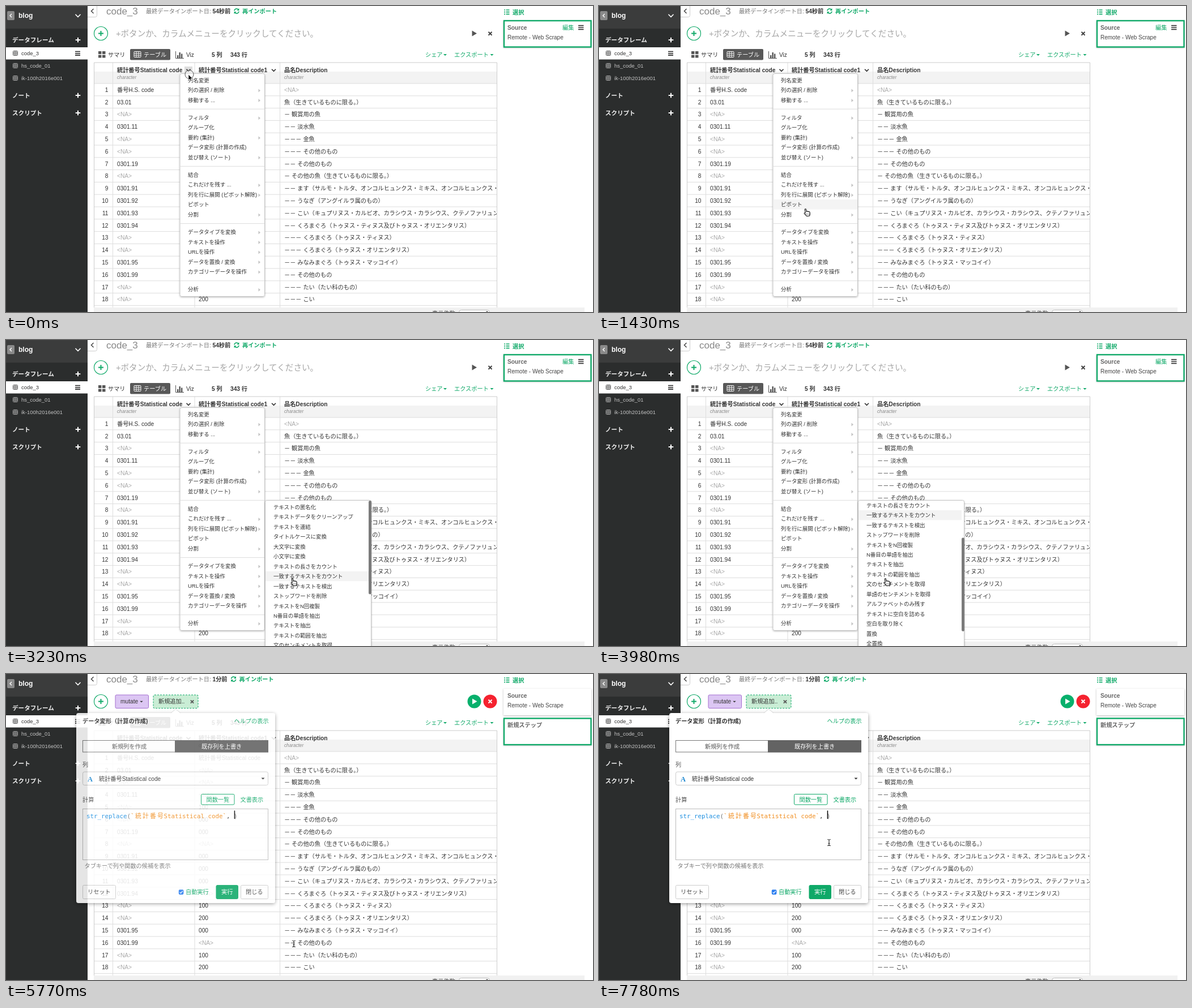
An HTML page for the animation above (8 s loop, 1036 by 541 pixels).

```html
<!DOCTYPE html>
<html lang="ja">
<head>
<meta charset="utf-8">
<style>
html, body { margin: 0; width: 100%; height: 100%; overflow: hidden; background: #fff; }
svg { display: block; width: 1036px; height: 541px; font-family: "Liberation Sans", "Noto Sans CJK JP", "Noto Sans CJK", sans-serif; }
text { white-space: pre; }
</style>
</head>
<body>
<svg id="stage" viewBox="0 0 1036 541" xmlns="http://www.w3.org/2000/svg"></svg>
<script>
const GREEN = '#0fa968', INK = '#333', GRAY = '#aaa', LOOP = 8000;

// ---- drawing helpers (text y is the optical middle of the line) ----
const esc = s => s.replace(/&/g, '&amp;').replace(/</g, '&lt;');
const text = (x, y, s, fill = INK, size = 10.2, extra = '') =>
  `<text x="${x}" y="${(y + size * .37).toFixed(2)}" font-size="${size}" fill="${fill}" ${extra}>${esc(s)}</text>`;
const bold = (x, y, s, fill = INK, size = 10.2) => text(x, y, s, fill, size, 'font-weight="700"');
const medium = (x, y, s, fill = GREEN) => text(x, y, s, fill, 10.2, 'font-weight="500"');
const rect = (x, y, w, h, fill = 'none', extra = '') =>
  `<rect x="${x}" y="${y}" width="${w}" height="${h}" fill="${fill}" ${extra}/>`;
const path = (d, stroke, width = 1, extra = '') =>
  `<path d="${d}" fill="none" stroke="${stroke}" stroke-width="${width}" ${extra}/>`;
const shape = (d, fill) => `<path d="${d}" fill="${fill}"/>`;
const group = (id, body, extra = '') => `<g id="${id}" ${extra}>${body}</g>`;
const plus = (x, y, r, color, w) => path(`M${x - r} ${y}H${x + r}M${x} ${y - r}V${y + r}`, color, w);
const cross = (x, y, r, color, w) => path(`M${x - r} ${y - r}l${2 * r} ${2 * r}m0 ${-2 * r}l${-2 * r} ${2 * r}`, color, w);
const chevron = (x, y, r, color, w) => path(`M${x - r} ${y - r / 2}l${r} ${r}l${r} ${-r}`, color, w);
const left = (x, y, r, color, w) => path(`M${x + r / 2} ${y - r}l${-r} ${r}l${r} ${r}`, color, w);
const caretDown = (x, y, color, r = 3) => shape(`M${x - r} ${y - r / 2}h${2 * r}l${-r} ${r}z`, color);
const bars = (x, y, w, gap, color) => path([-1, 0, 1].map(i => `M${x} ${y + i * gap}h${w}`).join(''), color, 1.6);
const gridIcon = (x, y, w, h, color) =>
  rect(x, y, w, h, 'none', `stroke="${color}" rx="1"`) +
  path(`M${x} ${y + h / 3}h${w}M${x} ${y + h * 2 / 3}h${w}M${x + w / 3} ${y}v${h}M${x + w * 2 / 3} ${y}v${h}`, color, .9);

// ---- static page ----
function sidebar() {
  const section = (y, s) => bold(11, y, s, '#eee', 10.6) + plus(127, y, 4.3, '#fff', 2);
  return rect(0, 0, 144, 541, '#2b2d2d') + rect(0, 0, 144, 40, '#3b3c3c') +
    rect(2, 9, 13, 16, '#8a8a8a', 'rx="2"') + left(8.5, 17, 3, '#fff', 1.4) +
    bold(22, 17, 'blog', '#fff', 12) + chevron(127, 17, 4.5, '#fff', 1.6) +
    section(60, 'データフレーム') + section(158, 'ノート') + section(189, 'スクリプト') +
    rect(0, 73, 144, 21.5, '#fff') +
    gridIcon(12.5, 79.5, 8, 8, '#555') + text(27, 83.5, 'code_3', INK, 9.45) + bars(122, 83.7, 9, 3.2, '#222') +
    gridIcon(12.5, 101.5, 8, 8, '#aaa') + text(27, 105.7, 'hs_code_01', '#c4c4c4', 9.45) +
    gridIcon(12.5, 123.5, 8, 8, '#aaa') + text(27, 127.7, 'ik-100h2016e001', '#c4c4c4', 9.45);
}

const refresh = x =>
  path(`M${x - 4} 8.5a4 4 0 0 1 7-2.3M${x + 4} 9.5a4 4 0 0 1-7 2.3`, GREEN, 1.5) +
  shape(`M${x + 4.4} 4v4h-4zM${x - 4.4} 14v-4h4z`, GREEN);
const imported = (age, dx) => bold(364.5, 9, age) + refresh(407 - dx) + bold(417 - dx, 9, '再インポート', GREEN);

function header() {
  const bar = (x, h) => rect(x, 92 - h, 2.4, h, '#555');
  return rect(138, -4, 22.5, 23.5, '#fff', 'stroke="#ccc" rx="3"') + rect(138, -4, 6, 24, '#3b3c3c') +
    left(152.5, 9, 4, '#444', 1.5) +
    text(177, 9, 'code_3', '#888', 17) + text(247, 9, '最終データインポート日:', '#777') +
    `<circle cx="167.5" cy="48.5" r="12" fill="#fff" stroke="${GREEN}" stroke-width="1.2"/>` + plus(167.5, 48.5, 4.5, GREEN, 2) +
    [163, 170].map(x => rect(x, 80, 5.5, 5, '#555') + rect(x, 86.5, 5.5, 5, '#555')).join('') +
    text(180, 86, 'サマリ') + rect(219, 76, 71, 19.5, '#585858', 'rx="2"') +
    gridIcon(226, 80.5, 12, 10, '#fff') + text(243, 86, 'テーブル', '#fff') +
    path('M299.5 80V92.5H314', '#555') + bar(302, 5) + bar(305.5, 10) + bar(309, 7.5) + text(318, 86, 'Viz') +
    bold(363, 86, '5 列') + bold(396, 86, '343 行') +
    medium(740, 86, 'シェア') + caretDown(775, 86.5, GREEN) +
    medium(791, 86, 'エクスポート') + caretDown(857.5, 86.5, GREEN);
}

function table() {
  const NA = '<NA>', ROW = 21.8;
  const code = ['番号H.S. code', '03.01', NA, '0301.11', NA, NA, '0301.19', NA, '0301.91', '0301.92', '0301.93',
    '0301.94', NA, NA, '0301.95', '0301.99', NA, NA];
  const sub = ['統計番号Statistical code', NA, NA, NA, '100', '000', '000', NA, '000', '000', '000', NA,
    '100', '200', '000', NA, '100', '200'];
  const name = [NA, '魚（生きているものに限る。）', '－ 観賞用の魚', '－－ 淡水魚', '－－－ 金魚', '－－－ その他のもの',
    '－－ その他のもの', '－ その他の魚（生きているものに限る。）',
    '－－ ます（サルモ・トルタ、オンコルヒュンクス・ミキス、オンコルヒュンクス・クラルキ',
    '－－ うなぎ（アングイルラ属のもの）',
    '－－ こい（キュプリヌス・カルピオ、カラシウス・カラシウス、クテノファリュンゴドン',
    '－－ くろまぐろ（トゥヌス・ティヌス及びトゥヌス・オリエンタリス）', '－－－ くろまぐろ（トゥヌス・ティヌス）',
    '－－－ くろまぐろ（トゥヌス・オリエンタリス）', '－－ みなみまぐろ（トゥヌス・マッコイイ）', '－－ その他のもの',
    '－－－ たい（たい科のもの）', '－－－ こい'];
  const cell = (x, y, s) => text(x, y, s, s === NA ? GRAY : INK);
  const italic = x => text(x, 126, 'character', '#888', 8.2, 'font-style="italic"');
  let out = rect(155, 116, 711, 21, '#f3f3f3');
  code.forEach((c, i) => {
    const y = 148 + ROW * i, line = (137 + ROW * i).toFixed(1);
    out += path(`M155 ${line}H866`, '#ddd') + text(180.5, y, String(i + 1), INK, 10.2, 'text-anchor="end"') +
      cell(196, y, c) + cell(340, y, sub[i]) + cell(491, y, name[i]);
  });
  out += path('M155 529.4H866M188.5 100V533M333 100V533M483.5 100V533', '#ddd') +
    bold(196, 113, '統計番号Statistical code') + bold(340, 113, '統計番号Statistical code1') +
    bold(491, 113, '品名Description') + italic(196) + italic(340) + italic(491) +
    rect(315, 107, 14, 13, '#ddd', 'id="pressed"') +
    chevron(322, 113.5, 3.5, '#333', 1.7) + chevron(472.5, 113.5, 3.5, '#333', 1.7);
  return `<clipPath id="tableClip">${rect(155, 99, 711, 442)}</clipPath><g clip-path="url(#tableClip)">${out}</g>` +
    path('M155.5 541V100H866.5V541', '#ccc') +
    rect(155, 533, 866, 8, '#f1f1f1') + text(752, 543, '表示件数:', '#555') +
    rect(799.5, 537.5, 54, 16, '#fff', 'rx="4" stroke="#bbb"') + text(806, 543, '600', INK, 9.5) + shape('M847 541l2-2l2 2z', '#555');
}

const card = (y, selected) => rect(878, y, 155, 47, '#fff', 'filter="url(#soft)"') +
  (selected ? rect(879, y, 153.5, 46.5, '#fff', `stroke="${GREEN}" stroke-width="2.4"`) : '');
const source = () => bold(885, 38, 'Source', '#666') + text(885, 55.7, 'Remote - Web Scrape', '#444', 10);

function before() {
  return imported('54秒前', 0) + text(194, 48.5, '+ボタンか、カラムメニューをクリックしてください。', '#a6a6a6', 14.6) +
    shape('M822.5 43.5L831 48.5L822.5 53.5z', '#555') + cross(854.5, 48.8, 3, '#444', 2) +
    card(26, true) + source() + medium(982, 38, '編集') + bars(1010, 38, 9.5, 3.4, '#333');
}

function after() {
  return imported('1分前', 5.4) +
    rect(193, 37, 58.5, 23.5, '#dcc6f3', 'stroke="#a36fd0" rx="2"') + text(202, 48.7, 'mutate') + caretDown(239, 49, '#333', 2.7) +
    rect(260, 37, 79, 23.5, '#c9edd5', `stroke="${GREEN}" stroke-dasharray="3 2" rx="2"`) +
    text(269, 48.7, '新規追加..') + cross(328.5, 49, 2.7, '#555', 1.7) +
    `<circle cx="826.5" cy="48.5" r="12" fill="#08b06c"/><circle cx="854.5" cy="48.5" r="12" fill="#f5222f"/>` +
    shape('M823 43.5L831.5 48.5L823 53.5z', '#fff') + cross(854.5, 48.5, 3, '#fff', 2) +
    card(26, false) + source() + card(78.5, true) + bold(885, 90, '新規ステップ', '#666');
}

// ---- menus ----
const MENU = [
  ['列名変更', '列の選択 / 削除>', '移動する ...>'],
  ['フィルタ>', 'グループ化', '要約 (集計)>', 'データ変形 (計算の作成)', '並び替え (ソート)>'],
  ['結合', 'これだけを残す ...>', '列を行に展開 (ピボット解除)>', 'ピボット', '分割>'],
  ['データタイプを変換>', 'テキストを操作>', 'URLを操作>', 'データを置換 / 変換>', 'カテゴリーデータを操作>'],
  ['分析>']];
const SUBMENU = ['テキストの匿名化', 'テキストデータをクリーンアップ', 'テキストを連結', 'タイトルケースに変換', '大文字に変換',
  '小文字に変換', 'テキストの長さをカウント', '一致するテキストをカウント', '一致するテキストを検出', 'ストップワードを削除',
  'テキストをN回複製', 'N番目の単語を抽出', 'テキストを抽出', 'テキストの範囲を抽出', '文のセンチメントを取得',
  '単語のセンチメントを取得', 'アルファベットのみ残す', 'テキストに空白を詰める', '空白を取り除く', '置換', '全置換',
  '欠損値を置換', 'テキストを分割', '単語をステミング'];
const ITEM = 17.5, SUB_ITEM = 17.45, SUB_TOP = 286.75;
const menuRows = [];

function menu() {
  let y = 131, arrows = '', labels = '';
  MENU.forEach((items, g) => {
    if (g) { arrows += path(`M307 ${y - 15}H456`, '#ddd'); }
    for (const item of items) {
      if (item.endsWith('>')) arrows += shape(`M445.5 ${y - 2}l3.5 3l-3.5 3z`, '#c4c4c4');
      labels += text(321, y, item.replace('>', ''), INK, 9.45);
      menuRows.push(y);
      y += ITEM;
    }
    y += 13.7;
  });
  return rect(307, 119.5, 149.5, 394, '#fff', 'rx="3" stroke="#c6c6c6" filter="url(#soft)"') + arrows +
    rect(307.5, 0, 148.5, ITEM, '#f4f4f4', 'id="menuHover"') + labels;
}

function submenu() {
  const items = SUBMENU.map((s, i) => text(472, 295.5 + SUB_ITEM * i, s, INK, 9.45)).join('');
  return rect(457.5, 283.5, 187, 280, '#fff', 'rx="3" stroke="#c6c6c6" filter="url(#soft)"') +
    `<clipPath id="subClip">${rect(457, 284, 188, 257)}</clipPath><g clip-path="url(#subClip)">` +
    group('subItems', rect(458, 0, 182, SUB_ITEM, '#f3f3f3', 'id="subHover"') + items) + '</g>' +
    rect(640, 284, 5, 165.5, '#7b7b7b', 'id="thumb" rx="2.5"');
}

// ---- dialog ----
function dialog() {
  const CELL = 6.5, mono = 'font-family="DejaVu Sans Mono, monospace"';
  const code = (col, s, fill) => text(142 + col * CELL, 250.5, s, fill, 10.8, mono);
  const wide = [...'統計番号'].map((c, i) => text(228.1 + i * 2 * CELL, 250.5, c, '#f08c1c', 10.8)).join('');
  const button = (x, y, w, h, fill = '#fff', stroke = '#ccc') => rect(x, y, w, h, fill, `stroke="${stroke}" rx="2"`);
  return rect(124, 69, 351, 336, '#fff', 'rx="4" filter="url(#deep)"') + shape('M291 69.5L299.5 62L308 69.5z', '#fff') +
    path('M291 69L299.5 61.8L308 69', '#ccc', .8) +
    bold(135, 83.5, 'データ変形（計算の作成)') + text(402.5, 83.5, 'ヘルプの表示', GREEN) +
    rect(135.5, 117.5, 327, 20.5, '#fff', 'stroke="#777"') + rect(298, 117, 165, 21.5, '#636363') +
    text(187, 128, '新規列を作成', '#555') + text(345, 128, '既存列を上書き', '#fff') +
    text(135, 160, '列', '#555') + rect(135.5, 173, 327, 23.5, '#fff', 'stroke="#ccc" rx="3"') +
    text(144, 185, 'A', '#1a86d0', 12.5, 'font-family="Liberation Serif, serif" font-weight="700"') +
    text(164, 185, '統計番号Statistical code') + caretDown(453.5, 185, '#333', 3) +
    text(135, 222, '計算', '#555') + button(344.5, 212.5, 58.5, 18.5, '#fff', GREEN) +
    text(353.5, 222, '関数一覧', GREEN) + text(413.5, 222, '文書表示', GREEN) +
    rect(135.5, 238.5, 327, 90, '#fff', 'stroke="#bbb"') +
    code(0, 'str_replace', '#1d8fe0') + code(11, '(', '#777') + code(12, '`', '#f08c1c') + wide +
    code(21, 'Statistical code`', '#f08c1c') + code(38, ',', '#333') + code(40, ')', '#777') +
    rect(402.7, 241.5, 1.5, 14.5, '#000', 'id="caret"') +
    text(138.5, 339.5, 'タブキーで列や関数の候補を表示', '#777') +
    button(135.5, 373.5, 58, 24) + text(144, 385.3, 'リセット', '#444') +
    rect(304.8, 381.3, 8.6, 8.6, '#2d7ff0', 'rx="1.8"') + path('M306.7 385.8l1.8 1.8l3.2-4', '#fff', 1.2) +
    text(317, 385.3, '自動実行', GREEN) + button(371, 373.5, 38.5, 24, GREEN, GREEN) + medium(380, 385.3, '実行', '#fff') +
    button(414.5, 373.5, 48, 24) + text(423, 385.3, '閉じる', '#444');
}

function cursors() {
  const arrow = `<circle cx="1.5" cy="0" r="7.5" fill="#fff" fill-opacity=".45" stroke="#555" stroke-width="1"/>` +
    '<path d="M0 0V10.2L2.4 8.1L4 11.6L5.7 10.9L4.1 7.5H7.2Z" fill="#000" stroke="#fff" stroke-width=".7"/>';
  const hand = '<path transform="translate(-5.5 -6.8) rotate(-8 5 6)" d="M2.4 7.3V1.4a1.1 1.1 0 0 1 2.2 0V5c.8-.5 1.8-.2 2 .4.8-.4 1.7 0 1.9.6.9-.3 1.9.2 1.9 1.2V9.6c0 2-.9 3-1.4 3.9H4.2C3 11.6 1.2 9.8.5 8.4c-.5-1.1.8-1.9 1.9-1.1z" fill="#fff" stroke="#111" stroke-width="1.1"/>' +
    path('M5.2 2v3M-.2 2v3M2.5 2v3', '#111', .6, 'transform="translate(-1.5 -.4)"');
  const beam = path('M-2.8-5.5Q0-5.5 0-4V4Q0 5.5-2.8 5.5M2.8-5.5Q0-5.5 0-4M0 4Q0 5.5 2.8 5.5M-1.5 1.5h3', '#222', 1.1);
  return group('arrow', arrow) + group('hand', hand) + group('beam', beam);
}

const shadow = (id, blur, dy, alpha) => `<filter id="${id}" x="-10%" y="-15%" width="120%" height="130%">
  <feDropShadow dx="0" dy="${dy}" stdDeviation="${blur}" flood-color="#000" flood-opacity="${alpha}"/></filter>`;
const stage = document.getElementById('stage');
stage.innerHTML = shadow('soft', 1.6, 1, .28) + shadow('deep', 3, 1.5, .4) + rect(0, 0, 1036, 541, '#fff') +
  header() + table() + sidebar() +
  path('M879 7h2M879 10.7h2M879 14.4h2M882.5 7h6M882.5 10.7h6M882.5 14.4h6', GREEN, 1.7) + bold(894, 11, '選択', GREEN) +
  group('before', before()) + group('after', after()) + group('menu', menu()) + group('submenu', submenu()) +
  group('dialog', dialog()) + cursors();
const el = {};
stage.querySelectorAll('[id]').forEach(node => { el[node.id] = node; });

const POINTER = [[0, 322, 121], [150, 326, 142], [300, 332, 175], [450, 337, 212], [610, 342, 250], [770, 346, 282],
  [950, 350, 304], [1130, 354, 322], [1280, 362, 350], [1430, 367, 365], [1580, 367, 377], [1730, 365, 389],
  [1880, 364, 399], [2030, 367, 407], [2180, 376, 413], [2330, 387, 418], [2480, 388, 419],
  [2780, 412, 421], [2930, 450, 424], [3080, 490, 427], [3230, 508, 428], [4420, 508, 440], [4570, 508, 455],
  [4720, 508, 468], [4870, 509, 482], [5470, 508, 477], [6270, 470, 424], [6425, 412, 352], [6580, 372, 312],
  [6735, 392, 300], [6890, 406, 298]];
const SCROLL = [[0, 0], [3680, 24], [3830, 66], [3980, 108], [4130, 135], [4280, 149], [4420, 154]];
const FADE = [[0, 0], [5620, .45], [5770, .88], [5940, 1]];
const held = (keys, t) => keys.reduce((last, k) => k[0] <= t ? k : last);
const show = (node, on) => node.setAttribute('visibility', on ? 'visible' : 'hidden');

function render(t) {
  const [, x, y] = held(POINTER, t), scroll = held(SCROLL, t)[1], fade = held(FADE, t)[1];
  const menuOpen = t < 5470, subOpen = t >= 2330 && menuOpen, scrolling = t >= 3680 && t < 4420;
  const kind = t < 150 ? 'arrow' : menuOpen ? 'hand' : 'beam';
  for (const k of ['arrow', 'hand', 'beam']) show(el[k], k === kind);
  el[kind].setAttribute('transform', `translate(${x} ${y})`);

  show(el.pressed, t < 150);
  show(el.before, t < 5620);
  show(el.after, t >= 5620);
  show(el.menu, menuOpen);
  show(el.submenu, subOpen);

  const tip = y - 7;
  const row = kind === 'hand' && x < 457 ? menuRows.find(r => Math.abs(tip - r) <= ITEM / 2) : undefined;
  show(el.menuHover, row !== undefined);
  if (row !== undefined) el.menuHover.setAttribute('y', row - ITEM / 2);

  const item = scrolling ? 7 : Math.floor((tip - SUB_TOP + scroll) / SUB_ITEM);
  show(el.subHover, subOpen && x >= 457);
  el.subHover.setAttribute('y', SUB_TOP + item * SUB_ITEM);
  el.subItems.setAttribute('transform', `translate(0 ${-scroll})`);
  el.thumb.setAttribute('y', 284 + scroll * .607);

  show(el.dialog, fade > 0);
  el.dialog.setAttribute('opacity', fade);
  show(el.caret, fade > 0 && !(t >= 6425 && t < 6880) && !(t >= 7330 && t < 7780));
}

const start = performance.now();
function tick() {
  render((performance.now() - start) % LOOP);
  requestAnimationFrame(tick);
}
tick();
</script>
</body>
</html>
```
